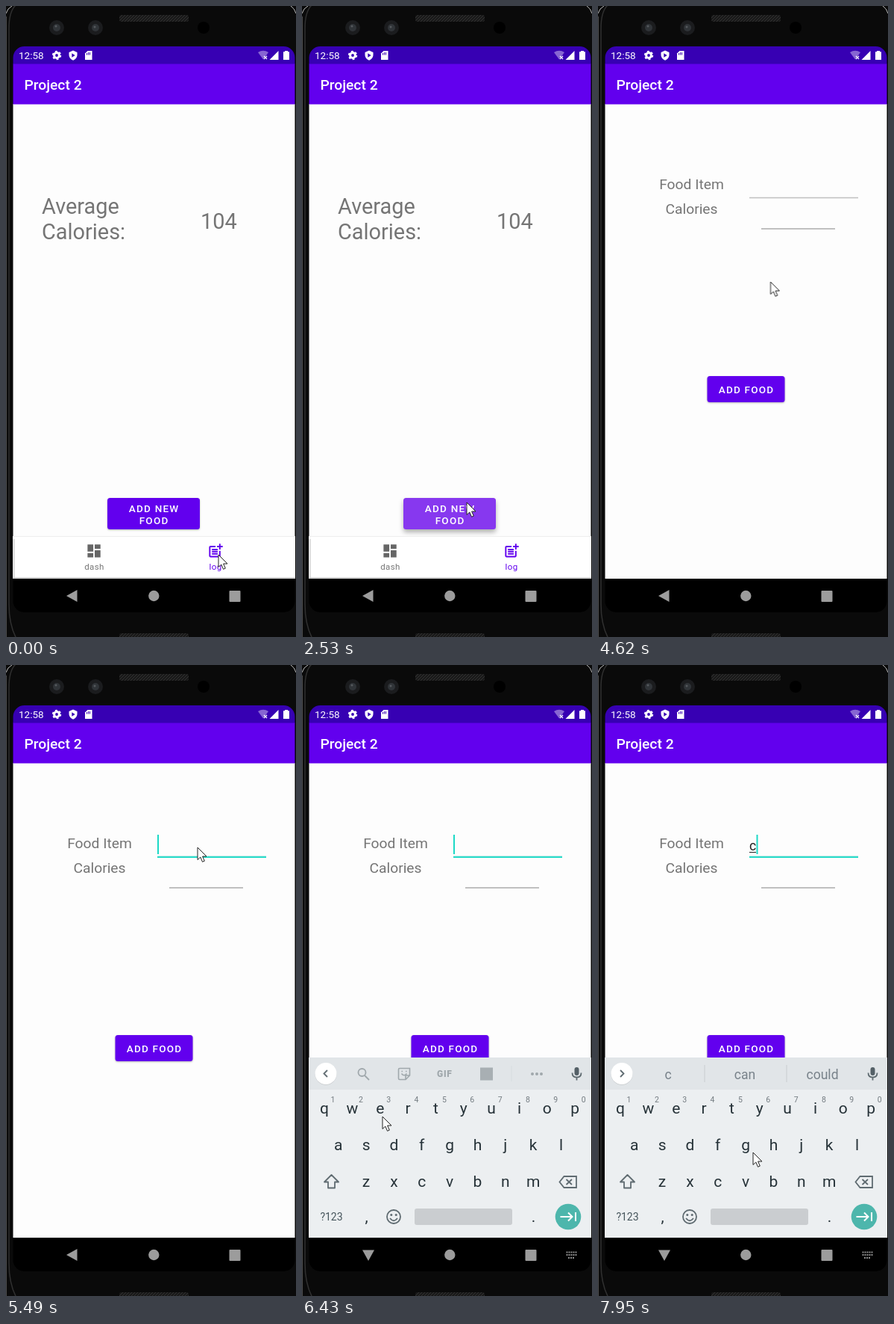
Animation of 389 by 844 pixels, one loop 8000 ms. Source, as an HTML page:

```html
<!DOCTYPE html>
<html lang="en">
<head>
<meta charset="utf-8">
<title>Calorie log</title>
<style>
html, body { margin: 0; width: 100%; height: 100%; overflow: hidden; background: #0a0a0a; }
svg { display: block; width: 100%; height: 100%; font-family: Roboto, sans-serif; }
.mid { text-anchor: middle; }
.label { font-size: 19.25px; fill: #757575; }
.big { font-size: 28.9px; fill: #757575; }
.btn { font-size: 13.5px; font-weight: 500; letter-spacing: 1.2px; fill: #fff; }
.tab { font-size: 11.5px; letter-spacing: .4px; }
.key { font-size: 21px; fill: #263238; }
.hint { font-size: 10.5px; fill: #737b80; }
.word { font-size: 17.6px; fill: #78828a; }
.line { fill: none; stroke: #5f6b71; stroke-width: 1.8; }

/* One 8 s clock; every change is a hard step. */
.t { animation: 8s step-end infinite; }
.log { animation-name: log; }
.form { animation-name: form; }
.raised { animation-name: raised; }
.press { animation-name: press; }
.focus { animation-name: focus; }
.caret { animation-name: caret; }
.typed { animation-name: typed; }
.board { animation-name: board; }
.tools { animation-name: tools; }
.words { animation-name: words; }
.chevron { animation-name: chevron; transform-origin: 32px 546.5px; }
.back { animation-name: back; transform-origin: 89px 789px; }
.switch { animation-name: switch; }
.mouse { animation-name: mouse; }

@keyframes log { 0% { opacity: 1 } 55.875% { opacity: 0 } }
@keyframes form { 0% { opacity: 0 } 55.875%, 100% { opacity: 1 } }
@keyframes raised {
  0% { filter: drop-shadow(0 1.5px 1px rgba(0,0,0,.28)) }
  31.625%, 100% { filter: drop-shadow(0 4px 3px rgba(0,0,0,.3)) }
}
@keyframes press { 0% { fill: #6200ee } 31.625% { fill: #8738ef } 33.5%, 100% { fill: #6200ee } }
@keyframes focus { 0% { opacity: 0 } 67.125%, 100% { opacity: 1 } }
@keyframes caret {
  0% { opacity: 0 }
  68.625% { opacity: 1 }
  73.625% { opacity: 0 }
  78.5% { opacity: 1 }
  85.625% { opacity: 0 }
  92% { opacity: 1; transform: none }
  97.5%, 100% { opacity: 1; transform: translate(9.5px, 0) }
}
@keyframes typed { 0% { opacity: 0 } 97.5%, 100% { opacity: 1 } }
@keyframes board {
  0% { opacity: 0; transform: translate(0, 31px) }
  75.5% { opacity: .3; transform: translate(0, 31px) }
  77% { opacity: .65; transform: translate(0, 18px) }
  78.5% { opacity: .88; transform: translate(0, 8px) }
  80.375%, 100% { opacity: 1; transform: none }
}
@keyframes tools { 0% { opacity: 0 } 80.375% { opacity: .5 } 81.875% { opacity: 1 } 99.375%, 100% { opacity: 0 } }
@keyframes words { 0% { opacity: 0 } 99.375%, 100% { opacity: 1 } }
@keyframes chevron { 0% { transform: none } 80.375% { transform: rotate(180deg) } 99.375%, 100% { transform: none } }
@keyframes back { 0% { transform: none } 75.5% { transform: rotate(-45deg) } 77%, 100% { transform: rotate(-90deg) } }
@keyframes switch { 0% { opacity: 0 } 73.625%, 100% { opacity: 1 } }
@keyframes mouse {
  0% { transform: translate(285px, 734px) }
  8.875% { transform: translate(278.5px, 729.5px) }
  10.75% { transform: translate(259px, 703px) }
  12.25% { transform: translate(238px, 677px) }
  15.75% { transform: translate(221px, 664px) }
  47.5% { transform: translate(221px, 610px) }
  49% { transform: translate(215px, 490px) }
  50.5% { transform: translate(211px, 424px) }
  57.75% { transform: translate(231.5px, 369px) }
  59.625% { transform: translate(243.5px, 314px) }
  61.5% { transform: translate(253.5px, 263px) }
  63.375% { transform: translate(256.5px, 248px) }
  65.25% { transform: translate(257px, 244px) }
  73.625% { transform: translate(201.5px, 335px) }
  75.5% { transform: translate(158px, 430px) }
  77% { transform: translate(122px, 490px) }
  78.5% { transform: translate(107px, 512px) }
  80.375% { transform: translate(108px, 604px) }
  81.875% { transform: translate(113.5px, 670px) }
  83.75% { transform: translate(117.5px, 706px) }
  85.625% { transform: translate(138px, 700px) }
  87.125% { transform: translate(154.5px, 696px) }
  89% { transform: translate(155px, 695px) }
  99.375%, 100% { transform: translate(208px, 652px) }
}
</style>
</head>
<body>
<svg viewBox="0 0 389 844" preserveAspectRatio="none">
  <defs>
    <clipPath id="screen"><rect x="9.5" y="54" width="378" height="757" rx="15"/></clipPath>
    <clipPath id="page"><rect x="9.5" y="131" width="378" height="635"/></clipPath>
    <pattern id="mesh" width="4" height="4" patternUnits="userSpaceOnUse">
      <rect width="4" height="4" fill="#191919"/><path d="M0 4L4 0" stroke="#333"/>
    </pattern>
  </defs>

  <!-- Phone body -->
  <rect width="389" height="844" fill="#0a0a0a"/>
  <path d="M14 -2Q4 6 4 30V800Q4 828 14 846" fill="none" stroke="#303030" stroke-width="1.5"/>
  <path d="M.5 844V14" stroke="#4a4a4a"/>
  <path d="M0 10Q2 3 8 0M389 10Q387 3 382 0" fill="none" stroke="#bbb"/>
  <rect x="152" y="12" width="93" height="9" rx="3" fill="url(#mesh)"/>
  <rect x="152" y="839" width="93" height="9" rx="3" fill="url(#mesh)"/>
  <g fill="#1b1c1e">
    <circle cx="68" cy="29" r="10"/><circle cx="120" cy="29" r="10"/>
    <circle cx="265" cy="29" r="8" fill="#000"/>
    <g fill="#303438"><circle cx="68" cy="29" r="5"/><circle cx="120" cy="29" r="5"/></g>
    <g fill="#55595d"><circle cx="67" cy="27" r="1.5"/><circle cx="119" cy="28" r="1.5"/></g>
  </g>

  <g clip-path="url(#screen)">
    <rect x="9" y="54" width="380" height="757" fill="#000"/>
    <rect x="9" y="131" width="380" height="635" fill="#fdfdfd"/>
    <rect x="9" y="54" width="380" height="24" fill="#3700b3"/>
    <rect x="9" y="77.5" width="380" height="54" fill="#6200ee"/>
    <text x="24.5" y="112" font-size="19.25" font-weight="500" fill="#fff">Project 2</text>

    <!-- Status bar -->
    <g fill="#fff">
      <text x="17" y="71" font-size="13.5">12:58</text>
      <circle cx="68" cy="66" r="3.4" fill="none" stroke="#fff" stroke-width="3"/>
      <circle cx="68" cy="66" r="5.3" fill="none" stroke="#fff" stroke-width="1.8" stroke-dasharray="2.775"/>
      <path d="M90 59.5L95.500 62V66Q95 70.500 90 72.800Q85 70.500 84.500 66V62Z"/>
      <path d="M88.300 63.300V68.700L92.700 66Z" fill="#3700b3"/>
      <path d="M109.500 60H115.500V72H106V63.500Z"/>
      <path d="M108.500 63V65.500M110.500 62V65.500M112.500 62V65.500" stroke="#3700b3"/>
      <path d="M338 62Q345 57.500 352 62L345 71.500Z" opacity=".4"/>
      <path d="M346 67L350 71M350 67L346 71" stroke="#fff" stroke-width="1.2"/>
      <path d="M365.500 60V72H353.500Z"/>
      <path d="M374 60H378V61.300H380V72H372V61.300H374Z"/>
    </g>

    <!-- Log page -->
    <g class="t log" clip-path="url(#page)">
      <text class="big" x="48" y="278">Average</text>
      <text class="big" x="48" y="312">Calories:</text>
      <text class="big" x="261" y="298">104</text>
      <g class="t raised"><rect class="t press" x="136" y="658" width="124" height="42" rx="3.5"/></g>
      <g class="btn mid"><text x="198.600" y="676.500">ADD NEW</text><text x="198.600" y="692.500">FOOD</text></g>
      <rect x="9" y="709" width="380" height="57" fill="#fff"/>
      <path d="M9 709.500H389" stroke="#eee"/>
      <path d="M10.500 713V766" stroke="#ccc" stroke-width="3" opacity=".6"/>
      <path d="M9 765H389" stroke="#c8c8c8" stroke-width="1.5"/>
      <path transform="translate(106.500 717.300) scale(.9625)" fill="#666"
        d="M3 13h8V3H3zM3 21h8v-6H3zM13 21h8V11h-8zM13 3v6h8V3z"/>
      <path transform="translate(269.500 717.300) scale(.9625)" fill="#6200ee"
        d="M17 19H5V7h7V5H5c-1.100 0-2 .9-2 2v12c0 1.100.9 2 2 2h12c1.100 0 2-.9 2-2v-7h-2zM19 2h-2v3h-3v2h3v3h2V7h3V5h-3zM7 9h8v2H7zM7 12h8v2H7zM7 15h8v2H7z"/>
      <text class="tab mid" x="118.500" y="753.500" fill="#757575">dash</text>
      <text class="tab mid" x="281" y="753.500" fill="#6200ee">log</text>
    </g>

    <!-- Form page -->
    <g class="t form">
      <text class="label mid" x="125.500" y="245">Food Item</text>
      <text class="label mid" x="125.500" y="278">Calories</text>
      <path d="M203 256.500H349" stroke="#c0c0c0" stroke-width="1.500"/>
      <path d="M219 298H318" stroke="#c0c0c0" stroke-width="1.800"/>
      <path class="t focus" d="M203 256.800H349" stroke="#2bdcca" stroke-width="2.200"/>
      <g class="t typed">
        <text x="203" y="248" font-size="17.6" fill="#222">c</text>
        <path d="M203 250.500H212" stroke="#222"/>
      </g>
      <rect class="t caret" x="203" y="227" width="2" height="26" fill="#1cd9c6"/>
      <rect x="146.500" y="495" width="104" height="35" rx="3.500" fill="#6200ee" style="filter:drop-shadow(0 1.5px 1px rgba(0,0,0,.28))"/>
      <text class="btn mid" x="199" y="517.500">ADD FOOD</text>
    </g>

    <!-- Keyboard -->
    <g class="t board">
      <rect x="9" y="525" width="380" height="241" fill="#eceff1"/>
      <rect x="9" y="525" width="380" height="43" fill="#e1e5e8"/>
      <circle cx="32" cy="547.300" r="14.500" fill="#000" opacity=".12"/>
      <circle cx="32" cy="546.500" r="14.500" fill="#fff"/>
      <path class="t chevron line" d="M30 542L34.500 546.500L30 551"/>
      <g class="t tools">
        <g class="line">
          <circle cx="80.500" cy="545" r="5"/><path d="M84 549L90 555"/>
          <path d="M131 539.500H144.500V549L139 554.500H131Q129.500 554.500 129.500 553V541Q129.500 539.500 131 539.500ZM139 554V549H144.500" stroke-width="1.600"/>
          <path d="M133.500 546.500Q137 551 140.500 546.500M133.500 543.500H135M139 543.500H140.500" stroke-width="1.500"/>
        </g>
        <text class="mid" x="191.300" y="550.500" font-size="12" font-weight="900" letter-spacing=".8" fill="#5f6b71">GIF</text>
        <rect x="239" y="538.500" width="17" height="17" fill="#6f797e"/>
        <path d="M281 536V557" stroke="#cfd4d7"/>
        <g fill="#5f6b71"><circle cx="309" cy="547" r="2"/><circle cx="315" cy="547" r="2"/><circle cx="321" cy="547" r="2"/></g>
      </g>
      <g class="t words">
        <g class="word mid"><text x="94" y="553.500">c</text><text x="197" y="553.500">can</text><text x="301" y="553.500">could</text></g>
        <path d="M143 535V558M253 535V558" stroke="#c8cdd0"/>
      </g>
      <rect x="365.500" y="538" width="6" height="11" rx="3" fill="#546067"/>
      <path class="line" d="M362.500 545.500Q362.500 551.500 368.500 551.500T374.500 545.500M368.500 551.500V555.500" stroke-width="1.600"/>

      <g id="keys" class="mid"></g>

      <path class="line" d="M39.500 682L49 691.500H44V699.500H35V691.500H30Z" stroke-linejoin="round"/>
      <path class="line" d="M351.500 684H368V699H351.500L345.500 691.500ZM354.500 688L362 695M362 688L354.500 695"/>
      <text class="mid" x="39.500" y="743" font-size="14" fill="#46555c">?123</text>
      <circle class="line" cx="123" cy="738" r="9"/>
      <path class="line" d="M118 740Q123 746.500 128 740"/>
      <g fill="#5f6b71"><circle cx="119.800" cy="735.500" r="1.500"/><circle cx="126.200" cy="735.500" r="1.500"/></g>
      <rect x="151" y="727" width="131" height="22" rx="3" fill="#cacdd0"/>
      <circle cx="357" cy="738" r="17.300" fill="#4db6ac"/>
      <path d="M346.500 738H362.500M357 732.500L362.500 738L357 743.500M367 732V744" fill="none" stroke="#fff" stroke-width="2"/>
    </g>

    <!-- System navigation -->
    <g fill="#9c9c9c">
      <path class="t back" d="M81 789L95.500 781V797Z"/>
      <circle cx="198.300" cy="789" r="7.200"/>
      <rect x="299.500" y="782" width="15" height="15" rx="1"/>
      <path class="t switch" d="M354.500 785.500H369M354.500 789H369M357 793H366" fill="none" stroke="#8c8c8c" stroke-width="2" stroke-dasharray="2 1"/>
    </g>
  </g>

  <path class="t mouse" d="M0 0V16.500L3.800 13L6.500 19.300L9.300 18.100L6.600 12H12Z" fill="#fff" stroke="#222"/>
</svg>
<script>
const keys = document.getElementById('keys');
const step = 37.35;

function addText(className, text, x, y) {
  const node = document.createElementNS(keys.namespaceURI, 'text');
  node.setAttribute('class', className);
  node.setAttribute('x', x);
  node.setAttribute('y', y);
  node.textContent = text;
  keys.append(node);
}

function addRow(letters, x, y, className = 'key') {
  [...letters].forEach((letter, i) => addText(className, letter, x + i * step, y));
}

addRow('qwertyuiop', 30, 600);
addRow('1234567890', 41.5, 585, 'hint');
addRow('asdfghjkl', 48.7, 649);
addRow('zxcvbnm', 86, 698);
addText('key', ',', 86.5, 745);
addText('key', '.', 310.5, 745);
</script>
</body>
</html>
```
